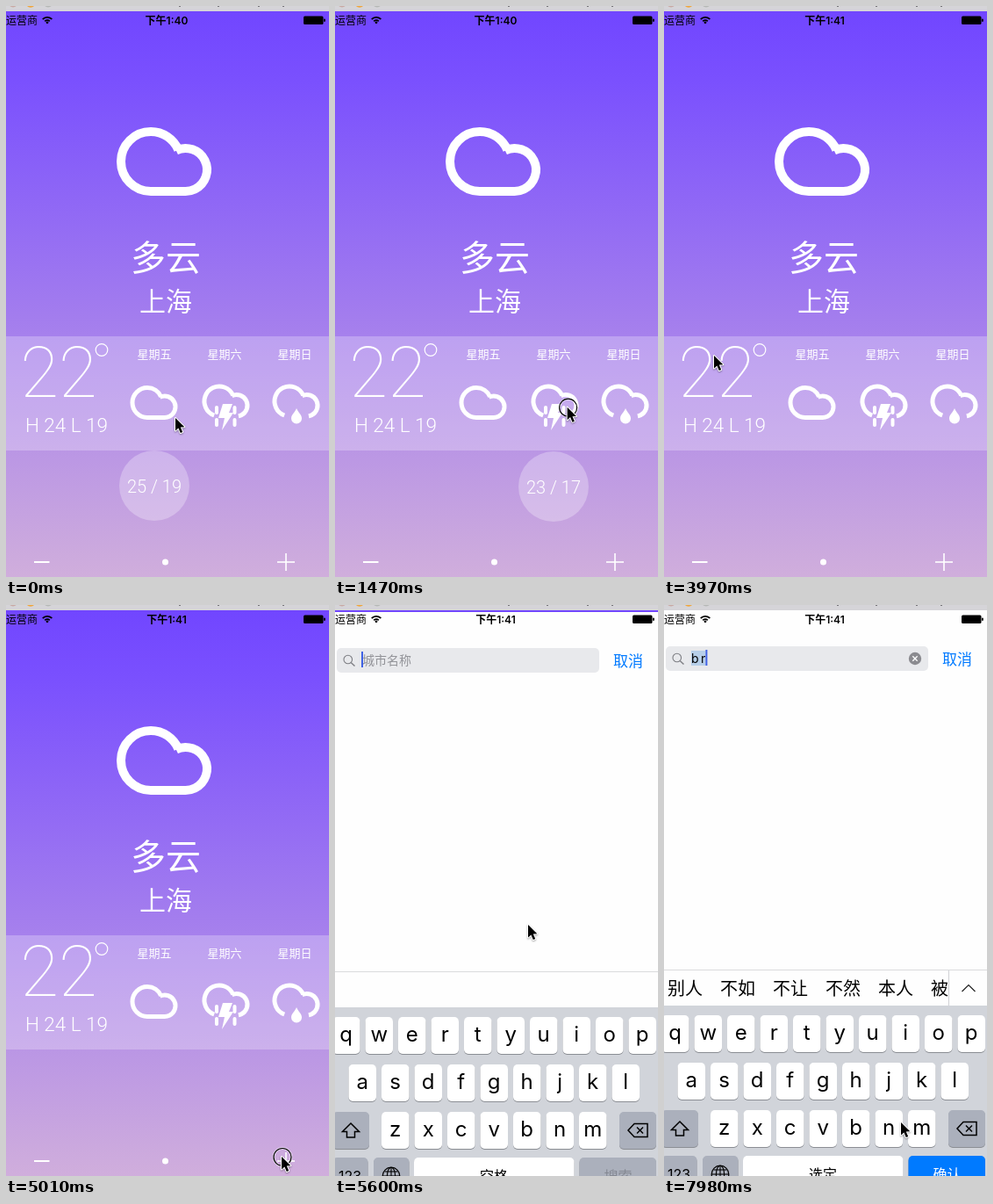
Recreate the animation shown at these times as an HTML page with a canvas. Size 368 by 650 pixels, loop 8 s.

```html
<!DOCTYPE html>
<html lang="zh-CN">
<head>
<meta charset="utf-8">
<title>Weather</title>
<style>
html, body { margin: 0; width: 100%; height: 100%; overflow: hidden; background: #fff; }
canvas { display: block; width: 368px; height: 650px; }
</style>
</head>
<body>
<canvas id="stage"></canvas>
<script>
const W = 368, H = 650, LOOP = 8000;
const canvas = document.getElementById('stage');
const dpr = window.devicePixelRatio || 1;
canvas.width = W * dpr;
canvas.height = H * dpr;
const ctx = canvas.getContext('2d');
ctx.scale(dpr, dpr);

const UI = 'Inter, "Noto Sans CJK SC", "Noto Sans CJK", sans-serif';
const NUM = 'Roboto, Inter, sans-serif';
const rad = d => d * Math.PI / 180;
const clamp = v => Math.max(0, Math.min(1, v));

function tickAt(t) {
  const s = t + 8;
  return Math.floor(t < 3960 ? s / 147 : 27 + (s - 3970) / 148.5);
}

// ---- drawing helpers ----
function text(s, x, y, size, { weight = 400, color = '#fff', align = 'center', family = UI } = {}) {
  ctx.font = `${weight} ${size}px ${family}`;
  ctx.fillStyle = color;
  ctx.textAlign = align;
  ctx.fillText(s, x, y);
}
function rect(x, y, w, h, color) {
  ctx.fillStyle = color;
  ctx.fillRect(x, y, w, h);
}
function round(x, y, w, h, r, color) {
  ctx.beginPath();
  ctx.roundRect(x, y, w, h, r);
  ctx.fillStyle = color;
  ctx.fill();
}
function disc(x, y, r, color) {
  ctx.beginPath();
  ctx.arc(x, y, r, 0, 7);
  ctx.fillStyle = color;
  ctx.fill();
}
function ring(x, y, r, color, width) {
  ctx.beginPath();
  ctx.arc(x, y, r, 0, 7);
  stroke(color, width);
}
function stroke(color, width) {
  ctx.strokeStyle = color;
  ctx.lineWidth = width;
  ctx.stroke();
}
function poly(points, close) {
  ctx.beginPath();
  for (let i = 0; i < points.length; i += 2) ctx.lineTo(points[i], points[i + 1]);
  if (close) ctx.closePath();
}
function line(points, color, width, close) {
  poly(points, close);
  stroke(color, width);
}

// ---- weather screen ----
function cloud(x, y, scale, open) {
  ctx.save();
  ctx.translate(x, y);
  ctx.scale(scale, scale);
  ctx.beginPath();
  ctx.arc(39, 39, 34, rad(open ? 110 : 90), rad(337));
  ctx.moveTo(78.5 + 24.5 * Math.cos(rad(-116)), 48.5 + 24.5 * Math.sin(rad(-116)));
  ctx.arc(78.5, 48.5, 24.5, rad(-116), rad(open ? 80 : 90));
  if (!open) ctx.lineTo(39, 73);
  stroke('#fff', 10);
  ctx.restore();
}

function storm() {
  cloud(223.5, 430.5, 0.5, true);
  for (const x of [238, 258.5])
    for (const y of [455, 469]) round(x, y, 4, 10, 2, '#fff');
  poly([247, 453, 258, 453, 254, 463, 259, 463, 246, 483, 249, 469, 242, 469], true);
  ctx.fillStyle = '#fff';
  ctx.fill();
}

function rain() {
  cloud(303.5, 430.5, 0.5, true);
  ctx.beginPath();
  ctx.moveTo(331, 458);
  ctx.bezierCurveTo(333, 463, 337, 465, 337, 469.5);
  ctx.arc(331, 469.5, 6, 0, Math.PI);
  ctx.bezierCurveTo(325, 465, 329, 463, 331, 458);
  ctx.fillStyle = '#fff';
  ctx.fill();
}

const bubbles = [
  { x: 169, label: '25 / 19', start: -30, end: 1.5 },
  { x: 249, label: '23 / 17', start: 6.1, end: 10.5 },
  { x: 329, label: '18 / 15', start: 12.9, end: 20 }
];

function bubble({ x, label, start, end }, n) {
  const u = n - start, out = clamp((n - end) / 2.4);
  if (u < 0 || out === 1) return;
  const spring = Math.exp(-0.95 * u) * Math.cos(1.1 * u);
  const y = 546 - 109 * spring - 109 * out * out;
  ctx.globalAlpha = Math.min(1, 0.3 + u) * (1 - out * out);
  disc(x, y, 40, 'rgba(255,255,255,.28)');
  text(label, x, y + 7.5, 20, { weight: 300, family: NUM });
  ctx.globalAlpha = 1;
}

const sky = ctx.createLinearGradient(0, 6, 0, H);
sky.addColorStop(0, '#7146ff');
sky.addColorStop(0.12, '#7a50fe');
sky.addColorStop(1, '#d0aedc');

function weather(n) {
  rect(0, 0, W, H, sky);
  cloud(126, 138, 1);
  text('多云', 182, 301, 40, { weight: 100 });
  text('上海', 182, 347, 30);
  for (const b of bubbles) bubble(b, n);
  rect(0, 376, W, 130, 'rgba(255,255,255,.25)');

  text('22', 60, 445, 80, { weight: 100, family: NUM });
  ring(109, 391.5, 6.8, '#fff', 1.2);
  text('H 24 L 19', 69, 485, 22.5, { weight: 300, family: NUM });
  ['星期五', '星期六', '星期日'].forEach((day, i) =>
    text(day, 169 + 80 * i, 401, 13, { weight: 300 }));
  cloud(141.5, 432, 0.5);
  storm();
  rain();

  rect(32, 632, 17.5, 2, '#fff');
  disc(181.5, 633, 3.5, '#fff');
  rect(309, 632.2, 20, 1.6, '#fff');
  rect(318.2, 623, 1.6, 20, '#fff');
}

// ---- city search sheet ----
function searchField(n, typed) {
  round(2, 47, 299, 28, 5, '#e8e9ec');
  ring(14.8, 60, 4.8, '#7d7e83', 1.1);
  line([18.2, 63.4, 22.5, 67.5], '#7d7e83', 1.4);
  text('取消', 317, 67.5, 17, { color: '#007aff', align: 'left' });

  const blue = '#3f62e4';
  if (!typed) {
    text('城市名称', 31, 65.5, 14, { color: '#929398', align: 'left' });
    if (n % 7 < 4) rect(30, 51, 2, 18, blue);
    return;
  }
  ctx.font = `400 14px ${UI}`;
  const w = ctx.measureText(typed).width;
  rect(31, 52, w, 17, '#b7cfe9');
  text(typed, 31, 66, 14, { color: '#000', align: 'left' });
  rect(31 + w, 51, 2, 18, blue);
  disc(286, 61, 7.2, '#8b8b90');
  line([283.3, 58.3, 288.7, 63.7], '#fff', 1.3);
  line([288.7, 58.3, 283.3, 63.7], '#fff', 1.3);
}

function candidates(typed) {
  rect(0, 415, W, 1, '#dadbdd');
  if (!typed) return;
  const words = typed.length > 1 ? ['别人', '不如', '不让', '不然', '本人', '被人'] : [...'不把被吧比并本'];
  const step = typed.length > 1 ? 60 : 46;
  ctx.save();
  ctx.beginPath();
  ctx.rect(0, 416, 324, 40);
  ctx.clip();
  words.forEach((w, i) => text(w, 4 + step * i, 443.5, 20, { color: '#000', align: 'left' }));
  ctx.restore();
  rect(324, 416, 1, 40, '#d0d1d4');
  line([339.5, 440, 347, 432.5, 354.5, 440], '#222', 1.2);
}

function key(x, y, w, color) {
  round(x, y + 1, w, 42, 5, '#8b8e94');
  round(x, y, w, 42, 5, color);
}

function keyboard(typed) {
  const dark = '#abb0bc', ink = '#000';
  rect(0, 456, W, 340, '#d1d4da');
  [['qwertyuiop', -3, 467], ['asdfghjkl', 15.5, 521], ['zxcvbnm', 53, 575]].forEach(([row, x0, y]) =>
    [...row].forEach((ch, i) => {
      const x = x0 + 37.5 * i;
      key(x, y, 31.5, '#fff');
      text(ch, x + 15.7, y + 27.5, 24, { color: ink });
    }));

  key(-3, 575, 42, dark);
  line([18, 588, 27.5, 597.5, 22.5, 597.5, 22.5, 604, 13.5, 604, 13.5, 597.5, 8.5, 597.5], ink, 1.5, true);
  key(324, 575, 42, dark);
  line([334, 596, 341, 588.5, 356, 588.5, 356, 603.5, 341, 603.5], ink, 1.5, true);
  line([344, 592.5, 351, 599.5], ink, 1.5);
  line([351, 592.5, 344, 599.5], ink, 1.5);

  key(-3, 627, 40.5, dark);
  text('123', 17, 654, 16, { color: ink });
  key(44, 627, 40.5, dark);
  ring(64, 648, 9.8, ink, 1.2);
  ctx.beginPath();
  ctx.ellipse(64, 648, 4.6, 9.8, 0, 0, 7);
  stroke(ink, 1.1);
  line([64, 638, 64, 658], ink, 1.1);
  line([54, 648, 74, 648], ink, 1.1);
  line([56.5, 643, 71.5, 643], ink, 1.1);
  key(90, 627, 182.5, '#fff');
  text(typed ? '选定' : '空格', 181, 654, 16, { color: ink });
  key(278.5, 627, 87.5, typed ? '#007aff' : dark);
  text(typed ? '确认' : '搜索', 322.5, 654, 16, { color: typed ? '#fff' : '#858993' });
}

function sheet(n) {
  const u = 2.6 * (n - 34.885);
  if (u < 0) return;
  const typed = n < 50 ? '' : n < 52 ? 'b' : 'b\u2009r';
  ctx.save();
  ctx.translate(0, Math.round(644 * (1 + u) * Math.exp(-u)));
  rect(0, 6, W, H, '#fefefe');
  searchField(n, typed);
  candidates(typed);
  keyboard(typed);
  ctx.restore();
}

// ---- overlays ----
function statusBar(n) {
  rect(0, 0, W, 6, '#d5d4d8');
  disc(8, -4, 5.5, '#c9a9a4');
  disc(28, -4, 5.8, '#f0a63c');
  disc(48, -4, 5.5, '#b5b8b5');
  for (const x of [197, 241, 287, 315]) rect(x, 0, 2, 1, '#77767a');

  text('运营商', 0, 20.5, 12, { color: '#000', align: 'left' });
  for (const r of [3.8, 7.2]) {
    ctx.beginPath();
    ctx.arc(47, 20, r, rad(-137), rad(-43));
    stroke('#000', 1.7);
  }
  disc(47, 18.8, 1.4, '#000');
  text(n < 13 ? '下午1:40' : '下午1:41', 183, 20.5, 12, { weight: 600, color: '#000' });
  round(339, 11.5, 22.5, 9.5, 1.5, '#000');
  round(362, 14.5, 1.8, 3.5, 1, '#000');
}

// tick, x, y
const path = [
  [0, 193, 469], [1, 193, 469], [4, 240, 440], [6, 283, 458], [8, 266, 456], [11, 264, 457],
  [13, 322, 458], [16, 327, 459], [20, 327, 459], [24, 287, 440], [26, 110, 366], [27, 57, 398],
  [28, 62, 410], [31, 275, 612], [34, 314, 628], [36, 278, 571], [38, 220, 364], [39, 180, 300],
  [43, 120, 350], [47, 172, 600], [54, 270, 589]
];
const clicks = [6, 10, 13, 20, 34];

function pointer(n) {
  const i = Math.max(1, path.findIndex(p => p[0] >= n));
  const [t0, x0, y0] = path[i - 1], [t1, x1, y1] = path[i];
  const k = (n - t0) / (t1 - t0);
  const x = x0 + (x1 - x0) * k, y = y0 + (y1 - y0) * k;
  if (clicks.includes(n)) {
    ring(x + 1, y + 0.5, 10, 'rgba(255,255,255,.6)', 2.5);
    ring(x + 1, y + 0.5, 10, '#000', 1.2);
  }
  ctx.save();
  ctx.translate(x, y);
  ctx.lineJoin = 'round';
  poly([0, 0, 0, 14.5, 3.4, 11.4, 5.8, 17, 8.2, 16, 5.8, 10.5, 10.3, 10.3], true);
  ctx.shadowColor = 'rgba(0,0,0,.35)';
  ctx.shadowBlur = 2 * dpr;
  ctx.shadowOffsetY = dpr;
  stroke('#fff', 2);
  ctx.shadowColor = 'transparent';
  ctx.fillStyle = '#000';
  ctx.fill();
  ctx.restore();
}

function draw(now) {
  const n = Math.min(54, tickAt(now % LOOP));
  weather(n);
  sheet(n);
  statusBar(n);
  pointer(n);
}

const begin = performance.now();
function loop() {
  draw(performance.now() - begin);
  requestAnimationFrame(loop);
}
loop();
</script>
</body>
</html>
```
